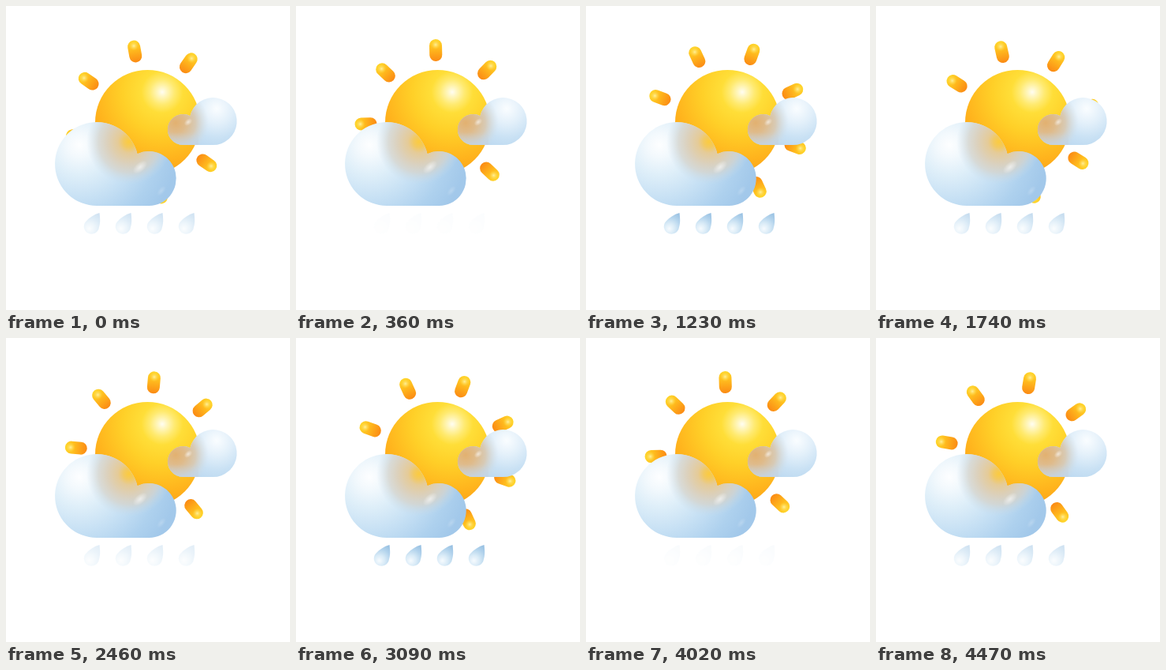
An HTML page for the animation above (4500 ms loop, 360 by 385 pixels).

```html
<!DOCTYPE html>
<html lang="en">
<head>
<meta charset="utf-8">
<title>Sun and showers</title>
<style>
  html, body { margin: 0; width: 100%; height: 100%; overflow: hidden; background: #fff; }
  svg { display: block; width: 100%; height: 100%; }
</style>
</head>
<body>
<svg viewBox="0 0 360 385">
  <defs>
    <radialGradient id="sunFill" gradientUnits="userSpaceOnUse" cx="198" cy="109" r="132">
      <stop offset="0" stop-color="#fffdf2"/>
      <stop offset=".04" stop-color="#fff7c4"/>
      <stop offset=".12" stop-color="#ffea70"/>
      <stop offset=".2" stop-color="#ffde38"/>
      <stop offset=".38" stop-color="#ffd028"/>
      <stop offset=".62" stop-color="#ffb61e"/>
      <stop offset=".85" stop-color="#fd9c15"/>
      <stop offset="1" stop-color="#f98c12"/>
    </radialGradient>
    <linearGradient id="rayFill" x1="0" y1="0" x2="0" y2="1">
      <stop offset="0" stop-color="#ffd62c"/>
      <stop offset=".4" stop-color="#ffbd1e"/>
      <stop offset="1" stop-color="#fb8a14"/>
    </linearGradient>
    <radialGradient id="rayGlow">
      <stop offset="0" stop-color="#fff3a8" stop-opacity=".9"/>
      <stop offset="1" stop-color="#ffe04a" stop-opacity="0"/>
    </radialGradient>
    <radialGradient id="bigFill" gradientUnits="userSpaceOnUse" cx="93" cy="176" r="125">
      <stop offset="0" stop-color="#fdfeff"/>
      <stop offset=".12" stop-color="#f3f9fd"/>
      <stop offset=".3" stop-color="#dfeff9"/>
      <stop offset=".55" stop-color="#c6e0f4"/>
      <stop offset=".8" stop-color="#aed1ee"/>
      <stop offset="1" stop-color="#a2c8ea"/>
    </radialGradient>
    <radialGradient id="bigTint" gradientUnits="userSpaceOnUse" cx="156" cy="172" r="54">
      <stop offset="0" stop-color="#fbcb3e"/>
      <stop offset=".13" stop-color="#f2c961"/>
      <stop offset=".26" stop-color="#e5cb98"/>
      <stop offset=".5" stop-color="#dccfb8" stop-opacity=".95"/>
      <stop offset=".72" stop-color="#d5d3cb" stop-opacity=".75"/>
      <stop offset="1" stop-color="#c6dbea" stop-opacity="0"/>
    </radialGradient>
    <radialGradient id="smallFill" gradientUnits="userSpaceOnUse" cx="267" cy="130" r="62">
      <stop offset="0" stop-color="#fafdff"/>
      <stop offset=".3" stop-color="#e3f0fa"/>
      <stop offset=".6" stop-color="#c9e1f4"/>
      <stop offset="1" stop-color="#b4d4ee"/>
    </radialGradient>
    <radialGradient id="smallTint" gradientUnits="userSpaceOnUse" cx="215" cy="148" r="42">
      <stop offset="0" stop-color="#e2b170"/>
      <stop offset=".3" stop-color="#dfbb8b"/>
      <stop offset=".6" stop-color="#d8c9b2" stop-opacity=".95"/>
      <stop offset="1" stop-color="#d0dbe4" stop-opacity="0"/>
    </radialGradient>
    <linearGradient id="smallShade" x1="0" y1="0" x2="0" y2="1">
      <stop offset=".6" stop-color="#c3d3e2" stop-opacity="0"/>
      <stop offset="1" stop-color="#c3d3e2" stop-opacity=".75"/>
    </linearGradient>
    <radialGradient id="gleam">
      <stop offset="0" stop-color="#fff" stop-opacity=".6"/>
      <stop offset="1" stop-color="#fff" stop-opacity="0"/>
    </radialGradient>
    <radialGradient id="dropFill" gradientUnits="userSpaceOnUse" cx="-3" cy="3" r="23">
      <stop offset="0" stop-color="#f6fbfe"/>
      <stop offset=".3" stop-color="#d7eaf7"/>
      <stop offset=".6" stop-color="#b3d4ed"/>
      <stop offset="1" stop-color="#8fbbe0"/>
    </radialGradient>
    <path id="big" d="M115 253A53 53 0 1 1 166.5 187.3A34.5 34.5 0 1 1 181.5 253Z"/>
    <path id="small" d="M224.5 176A19.5 19.5 0 1 1 233.4 139.2A30 30 0 1 1 262 176Z"/>
    <clipPath id="bigClip"><use href="#big"/></clipPath>
    <clipPath id="smallClip"><use href="#small"/></clipPath>
    <g id="ray">
      <rect x="-8" y="-105" width="16" height="28" rx="8" fill="url(#rayFill)"/>
      <circle cy="-98" r="6" fill="url(#rayGlow)"/>
    </g>
    <path id="drop" d="M10 -17C11 -9 11 -4 9.4 1.5A9.6 9.6 0 1 1 -7.6 -5.8C-3 -11 3 -15 10 -17Z" fill="url(#dropFill)"/>
  </defs>

  <g id="rays"></g>
  <circle cx="179.5" cy="147.5" r="66.5" fill="url(#sunFill)"/>

  <use href="#small" fill="url(#smallFill)"/>
  <g clip-path="url(#smallClip)">
    <rect x="204" y="115" width="54" height="62" fill="url(#smallTint)"/>
    <rect x="204" y="136" width="40" height="40" fill="url(#smallShade)"/>
    <ellipse cx="231" cy="147" rx="6" ry="4" fill="url(#gleam)" transform="rotate(-40 231 147)"/>
  </g>

  <use href="#big" fill="url(#bigFill)"/>
  <g clip-path="url(#bigClip)">
    <circle cx="156" cy="172" r="54" fill="url(#bigTint)"/>
    <ellipse cx="170" cy="204" rx="11" ry="6" fill="url(#gleam)" transform="rotate(-40 170 204)"/>
    <ellipse cx="197" cy="234" rx="8" ry="4" fill="url(#gleam)" opacity=".35" transform="rotate(-50 197 234)"/>
  </g>

  <g id="drops"></g>
</svg>
<script>
  const LOOP = 4500, STEP = 30;
  const SPIN = 0.0245, START_ANGLE = -10.3;
  const FADE = 1840, FADE_LOW = 385;

  const rays = document.getElementById('rays');
  const drops = document.getElementById('drops');

  function stamp(parent, id, transform) {
    const use = document.createElementNS('http://www.w3.org/2000/svg', 'use');
    use.setAttribute('href', '#' + id);
    use.setAttribute('transform', transform);
    parent.append(use);
  }
  for (let i = 0; i < 8; i++) stamp(rays, 'ray', `rotate(${i * 45})`);
  for (let i = 0; i < 4; i++) stamp(drops, 'drop', `translate(${108.5 + i * 40} 279)`);

  // Triangle wave: 0 at FADE_LOW, 1 half a period later.
  function dropOpacity(t) {
    const phase = ((t - FADE_LOW + FADE) % FADE) / FADE;
    return 1 - Math.abs(1 - 2 * phase);
  }

  function draw(t) {
    rays.setAttribute('transform', `translate(179.5 147) rotate(${START_ANGLE + SPIN * t})`);
    drops.setAttribute('opacity', dropOpacity(t).toFixed(3));
  }

  const begin = performance.now();
  function tick() {
    const t = (performance.now() - begin) % LOOP;
    draw(Math.floor(t / STEP) * STEP);
    requestAnimationFrame(tick);
  }
  tick();
</script>
</body>
</html>
```
